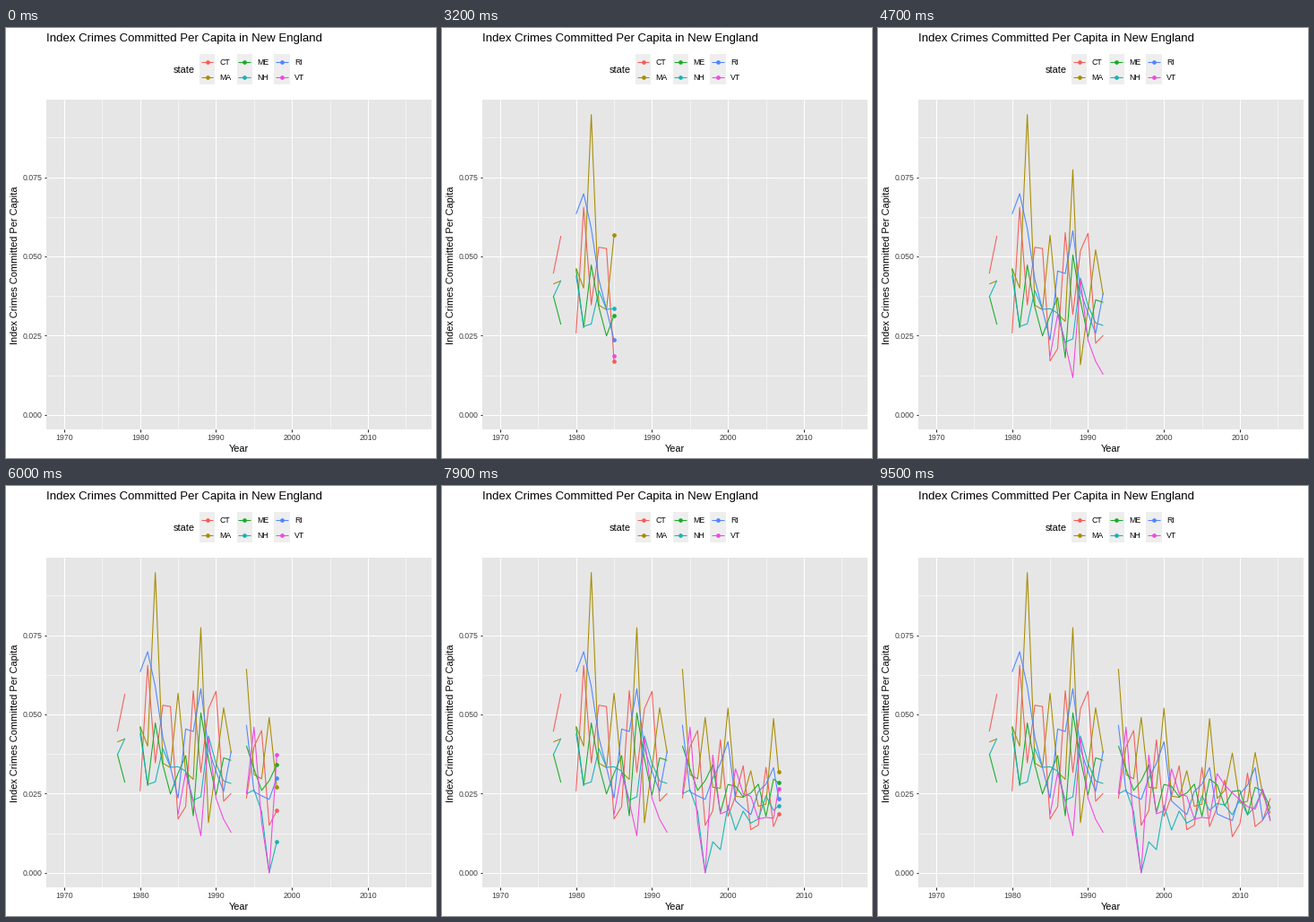
A matplotlib script that plays this animation: 480x480 px, repeating every 10 s.

```python
import numpy as np
import matplotlib.pyplot as plt
from matplotlib.animation import FuncAnimation
from matplotlib.patches import Rectangle

SIZE, DPI, FRAMES = 480, 72, 100
FIRST, LAST = 1970, 2016
LEFT, TOP, RIGHT, BOTTOM = 45.3, 80.0, 474.5, 448.4
GRAY, KEY_GRAY, TICK, LABEL = "#e6e6e6", "#eeeeee", "#2b2b2b", "#404040"
LINE, DOT = 1.07, 4.7

plt.rcParams["font.family"] = "Liberation Sans"
fig = plt.figure(figsize=(SIZE / DPI, SIZE / DPI), dpi=DPI, facecolor="white")
ax = fig.add_axes([0, 0, 1, 1])
ax.set(xlim=(0, SIZE), ylim=(SIZE, 0))
ax.axis("off")


def px(year):
    return 64.9 + (np.asarray(year) - FIRST) * 8.478


def py(rate):
    return 431.8 - np.asarray(rate) * 3536


def text(x, y, s, size, color="black", **kw):
    ax.text(x, y, s, fontsize=size, color=color, va="baseline", **kw)


def stroke(xs, ys, color, width=LINE, z=1, cap="butt"):
    return ax.plot(xs, ys, color=color, lw=width, zorder=z,
                   solid_capstyle=cap, solid_joinstyle="round")[0]


def dot(xs, ys, color, z):
    return ax.plot(xs, ys, "o", color=color, ms=DOT, mew=0, zorder=z)[0]


def box(x, y, w, h, color):
    ax.add_patch(Rectangle((x, y), w, h, fc=color, ec="none", zorder=0))


def draw_panel():
    box(LEFT, TOP, RIGHT - LEFT, BOTTOM - TOP, GRAY)
    for year in range(1970, 2020, 5):
        major = year % 10 == 0
        x = px(year)
        stroke([x, x], [TOP, BOTTOM], "white", LINE if major else LINE / 2)
        if major:
            stroke([x, x], [BOTTOM, BOTTOM + 2.75], TICK)
            text(x, 460, str(year), 8.8, LABEL, ha="center")
    for i in range(8):
        major = i % 2 == 0
        y = py(i * 0.0125)
        stroke([LEFT, RIGHT], [y, y], "white", LINE if major else LINE / 2)
        if major:
            stroke([LEFT - 2.75, LEFT], [y, y], TICK)
            text(40.3, y + 3.2, f"{i * 0.0125:.3f}", 8.8, LABEL, ha="right")
    text(45.3, 15, "Index Crimes Committed Per Capita in New England", 13.2)
    text(260, 473, "Year", 11, ha="center")
    text(13.4, 264.5, "Index Crimes Committed Per Capita", 11, ha="center",
         rotation=90, rotation_mode="anchor")


def draw_legend():
    side = 17.28
    text(186.5, 50, "state", 11)
    for i, (name, color) in enumerate(COLORS.items()):
        x, y = 215.9 + 41.75 * (i // 2), 28.9 + side * (i % 2)
        box(x, y, side, side, KEY_GRAY)
        mid = y + side / 2
        stroke([x + 1.7, x + side - 1.7], [mid, mid], color, z=2)
        dot([x + side / 2], [mid], color, 3)
        text(x + side + 5.5, mid + 3.2, name, 8.8)


COLORS = {"CT": "#f35e5a", "MA": "#a88c00", "ME": "#18ac28",
          "NH": "#17b3b7", "RI": "#4f86ff", "VT": "#f148df"}


class Run:
    """An unbroken stretch of years for one state, rates in 1/10000."""

    def __init__(self, state, start, rates):
        color = COLORS[state]
        z = list(COLORS).index(state) / 10
        years = start + np.arange(len(rates))
        self.xs, self.ys = px(years), py(np.array(rates) / 1e4)
        # every year snaps to the nearest tick of the clock
        self.keys = np.round((FRAMES - 1) * (years - FIRST) / (LAST - FIRST))
        self.line = stroke([], [], color, z=4 + z)
        self.head = dot([], [], color, 5 + z)

    def show(self, t):
        done = self.keys <= t
        xs, ys = self.xs[done], self.ys[done]
        hx, hy = [], []
        if self.keys[0] <= t < self.keys[-1]:
            hx = [np.interp(t, self.keys, self.xs)]
            hy = [np.interp(t, self.keys, self.ys)]
        self.line.set_data(np.append(xs, hx), np.append(ys, hy))
        self.head.set_data(hx, hy)


draw_panel()
draw_legend()

runs = [
    Run("CT", 1977, [446, 565]),
    Run("CT", 1980, [257, 655, 347, 529, 525, 170, 209, 575, 317, 518, 573,
                     226, 251]),
    Run("CT", 1994, [235, 398, 449, 150, 196, 420, 178, 243, 338, 136, 151,
                     333, 146, 206, 293, 114, 155, 315, 146, 166, 235]),
    Run("MA", 1977, [413, 423]),
    Run("MA", 1980, [463, 400, 948, 346, 332, 567, 318, 295, 774, 158, 335,
                     521, 378]),
    Run("MA", 1994, [644, 310, 297, 491, 270, 267, 520, 242, 238, 322, 210,
                     217, 487, 235, 260, 378, 220, 226, 380, 248, 188]),
    Run("ME", 1977, [376, 285]),
    Run("ME", 1980, [460, 275, 473, 340, 249, 314, 370, 180, 505, 360, 246,
                     363, 355]),
    Run("ME", 1994, [401, 328, 260, 291, 341, 190, 279, 273, 240, 252, 280,
                     178, 296, 278, 211, 257, 260, 183, 270, 258, 205]),
    Run("NH", 1977, [372, 424]),
    Run("NH", 1980, [440, 279, 287, 392, 333, 335, 321, 229, 240, 432, 345,
                     290, 282]),
    Run("NH", 1994, [249, 262, 194, 0, 98, 73, 213, 135, 195, 157, 170, 243,
                     197, 219, 214, 183, 232, 183, 210, 263, 168]),
    Run("RI", 1980, [634, 698, 588, 427, 333, 236, 454, 446, 581, 390, 320,
                     257, 385]),
    Run("RI", 1994, [467, 256, 243, 232, 299, 345, 414, 227, 205, 184, 257,
                     280, 332, 186, 175, 165, 249, 277, 332, 167, 205]),
    Run("VT", 1985, [185, 316, 225, 117, 427, 235, 169, 127]),
    Run("VT", 1994, [249, 460, 160, 0, 372, 186, 196, 328, 250, 242, 170,
                     175, 172, 313, 277, 252, 230, 209, 201, 263, 163]),
]


def update(t):
    for run in runs:
        run.show(t)
    return []


anim = FuncAnimation(fig, update, frames=FRAMES, init_func=lambda: update(0),
                     interval=100, repeat=True, repeat_delay=0, blit=False)
plt.show()
```
